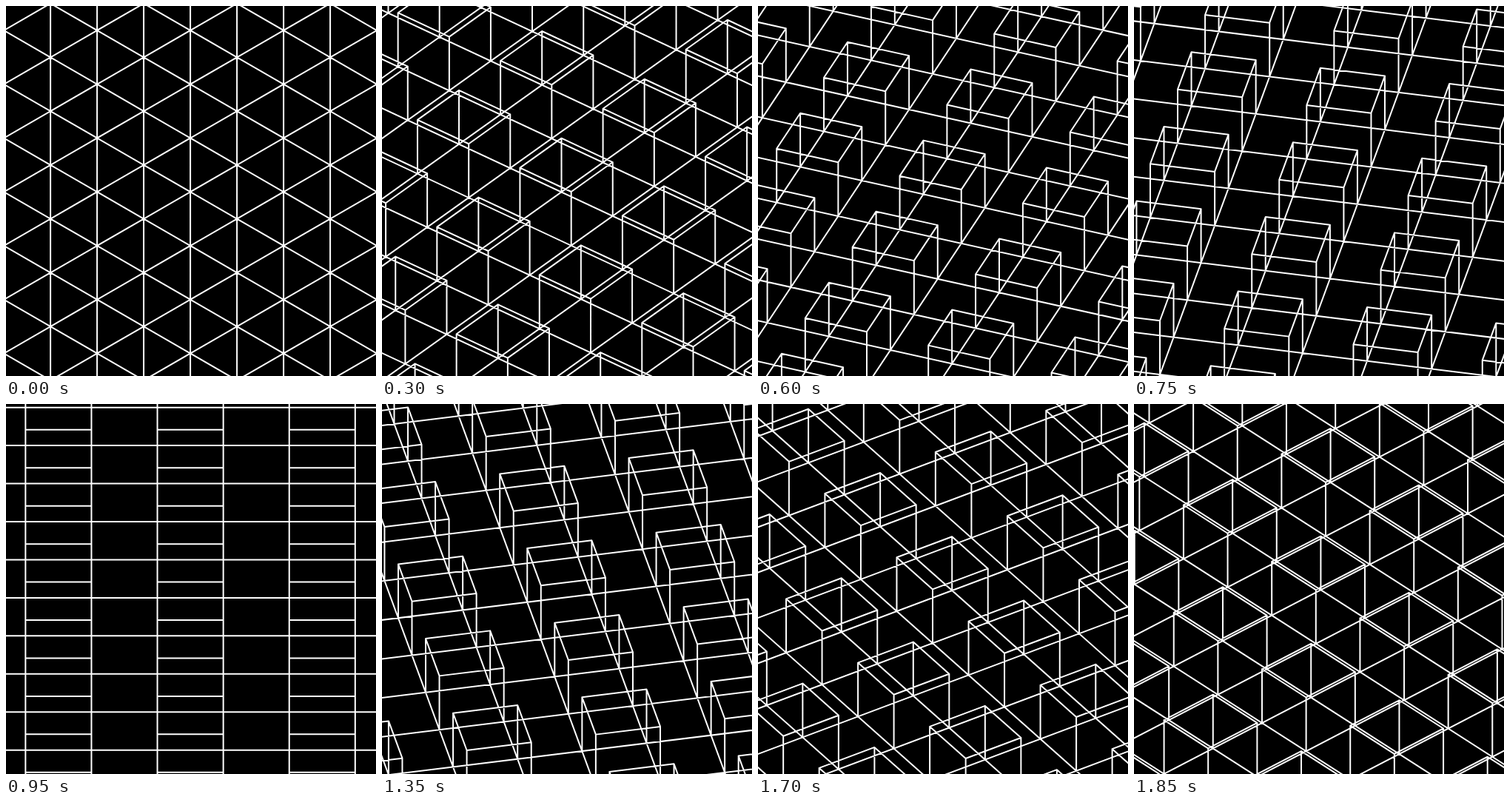
Recreate the animation shown at these times as an HTML page. Size 500 by 500 pixels, loop 1900 ms.

```html
<!DOCTYPE html>
<html lang="en">
<head>
<meta charset="utf-8">
<title>Turning cubes</title>
<style>
  html, body { margin: 0; width: 100%; height: 100%; overflow: hidden; background: #000; }
  svg { display: block; width: 100vw; height: 100vh; }
  path { fill: none; stroke: #fff; stroke-width: 2; stroke-linejoin: round; }
</style>
</head>
<body>
<svg viewBox="0 0 500 500"><path id="wire"/></svg>
<script>
  const LOOP = 1900, STEP = 50, TURN_STEPS = 15, STEP_ANGLE = 3;
  const EDGE = 89.1;                    // cube edge and grid cell
  const TILT = Math.sqrt(1 / 3);        // isometric foreshortening of the floor
  const RISE = EDGE * Math.sqrt(2 / 3); // projected cube height
  const CX = 249.1, CY = 287.6;
  const REACH = 10;
  const wire = document.getElementById('wire');

  // Two 45 degree turns, each advancing in even steps after a rest.
  function angleAt(t) {
    const turn = begin =>
      Math.min(TURN_STEPS, Math.max(0, Math.floor((t - begin) / STEP) + 1));
    return 45 - STEP_ANGLE * (turn(250) + turn(1200));
  }

  function draw(time) {
    const a = angleAt(time % LOOP) * Math.PI / 180;
    const c = Math.cos(a) * EDGE, s = Math.sin(a) * EDGE;
    const point = (x, y, lift = 0) =>
      (CX + x * c - y * s).toFixed(2) + ' ' +
      (CY + (x * s + y * c) * TILT - lift).toFixed(2);
    let d = '';
    const line = (from, to) => { d += `M${from}L${to}`; };

    for (let i = -REACH; i < REACH; i++) {
      const k = i + 0.5;
      line(point(k, -REACH), point(k, REACH));
      line(point(-REACH, k), point(REACH, k));
    }

    for (let x = -REACH; x <= REACH; x += 2) {
      for (let y = -REACH; y <= REACH; y += 2) {
        const corners = [[-1, -1], [1, -1], [1, 1], [-1, 1]]
          .map(([i, j]) => [x + i / 2, y + j / 2]);
        d += 'M' + corners.map(p => point(...p, RISE)).join('L') + 'Z';
        corners.forEach(p => line(point(...p), point(...p, RISE)));
      }
    }
    wire.setAttribute('d', d);
  }

  function tick() {
    draw(performance.now());
    requestAnimationFrame(tick);
  }

  draw(0);
  requestAnimationFrame(tick);
</script>
</body>
</html>
```
